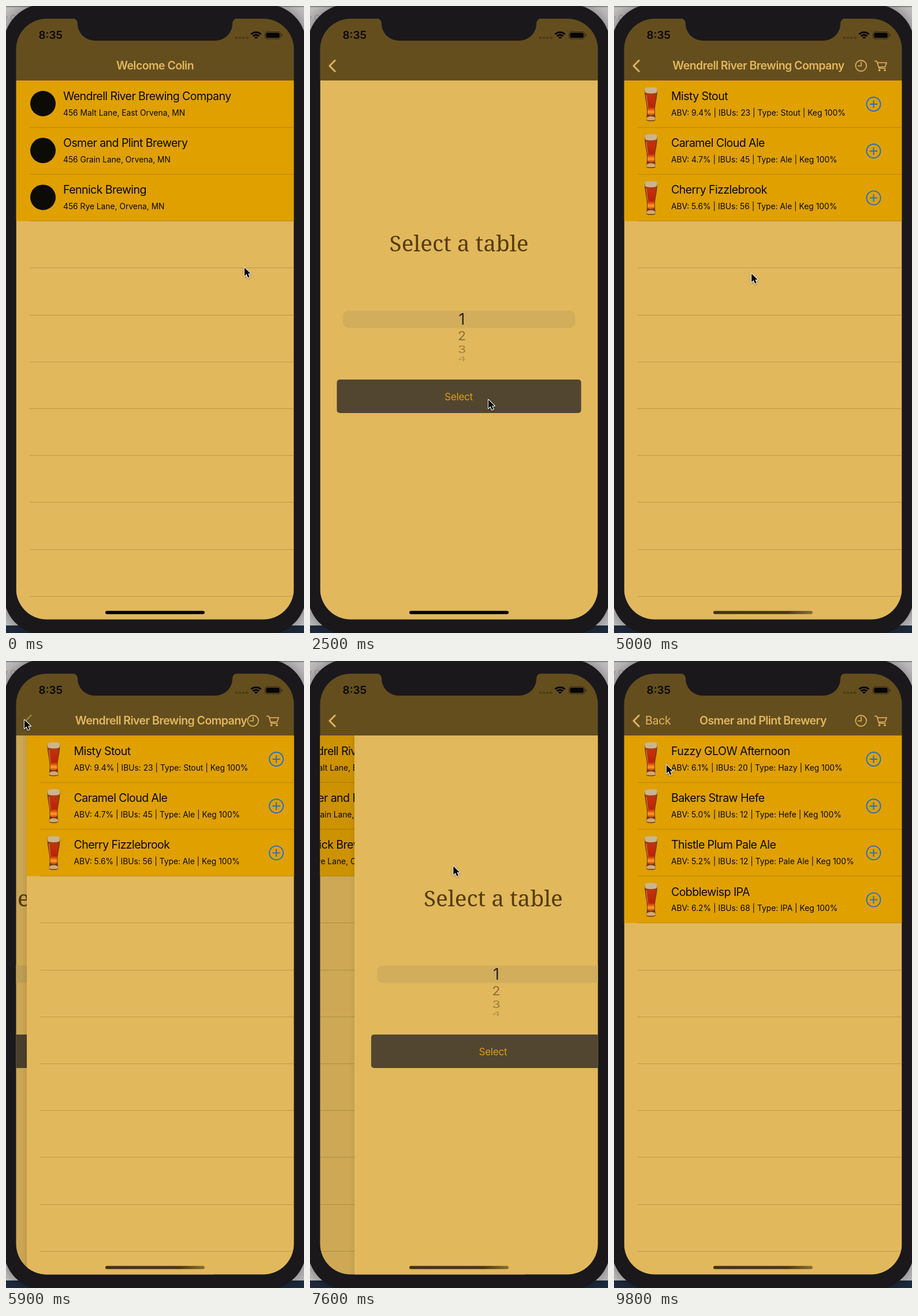
Write an HTML page with a canvas that moves like this. It is 516 px wide and 1086 px high and loops after 9900 ms.

```html
<!DOCTYPE html>
<html lang="en">
<head>
<meta charset="utf-8">
<title>Brewery ordering app</title>
<style>
html, body { margin: 0; width: 100%; height: 100%; overflow: hidden; background: #c1bfc0; }
canvas { display: block; width: 516px; height: 1086px; }
</style>
</head>
<body>
<canvas id="stage" width="516" height="1086"></canvas>
<script>
const ctx = document.getElementById('stage').getContext('2d');
const LOOP = 9900;
const SCREEN = { x: 17.5, y: 22, w: 481, h: 1040.5 };
const BAR_BOTTOM = 129, ROW = 81.2, EMPTY_ROW = 51.1;
const SAND = '#e1b85c', AMBER = '#dfa000', BROWN = '#644e1e', GOLD = '#e2b75e', INK = '#0b0903';
const SANS = 'Inter, sans-serif', SERIF = '"Noto Serif", serif';

const breweries = [
  ['Wendrell River Brewing Company', '456 Malt Lane, East Orvena, MN'],
  ['Osmer and Plint Brewery', '456 Grain Lane, Orvena, MN'],
  ['Fennick Brewing', '456 Rye Lane, Orvena, MN']
];
const beer = (name, abv, ibus, type) =>
  [name, `ABV: ${abv}% | IBUs: ${ibus} | Type: ${type} | Keg 100%`];

const home = { title: 'Welcome Colin', titleX: 258, draw: () => drawList(breweries, drawLogo) };
const table = { title: '', draw: drawTable };
const firstMenu = {
  title: breweries[0][0], titleX: 250, icons: true, loaded: 4400,
  beers: [
    beer('Misty Stout', '9.4', 23, 'Stout'),
    beer('Caramel Cloud Ale', '4.7', 45, 'Ale'),
    beer('Cherry Fizzlebrook', '5.6', 56, 'Ale')
  ],
  draw: drawMenu
};
const secondMenu = {
  title: breweries[1][0], titleX: 258, label: 'Back', icons: true, loaded: 9500,
  beers: [
    beer('Fuzzy GLOW Afternoon', '6.1', 20, 'Hazy'),
    beer('Bakers Straw Hefe', '5.0', 12, 'Hefe'),
    beer('Thistle Plum Pale Ale', '5.2', 12, 'Pale Ale'),
    beer('Cobblewisp IPA', '6.2', 68, 'IPA')
  ],
  draw: drawMenu
};

const moves = [
  { at: -1000, lower: home, upper: table, pop: true },
  { at: 950, lower: home, upper: table },
  { at: 3742, lower: table, upper: firstMenu },
  { at: 5894.5, lower: table, upper: firstMenu, pop: true },
  { at: 6649, lower: home, upper: table, pop: true },
  { at: 7350, lower: home, upper: table },
  { at: 9000, lower: table, upper: secondMenu }
];
const SLIDE = 500;

// Each key is [time, ...values].
const cursorPath = [
  [0, 412, 452], [800, 300, 186], [1150, 300, 186], [2100, 308, 681], [3650, 308, 681],
  [4100, 310, 601], [4700, 310, 590], [5600, 31, 101], [5950, 31, 101], [6500, 38, 112],
  [6950, 38, 112], [7300, 240, 250], [7450, 240, 250], [7850, 263, 576], [7950, 263, 576],
  [8400, 263, 504], [8550, 263, 490], [8900, 290, 678], [9150, 290, 678], [9750, 90, 179]
];
const pickerPath = [[7950, 0], [8400, 2.5], [8750, 3]];
const chevronPath = [
  [5700, 1], [5800, .42], [5950, .42], [6150, 1], [6550, 1], [6650, .25], [6950, .15], [7000, 0]
];

const clamp = v => Math.max(0, Math.min(1, v));

function track(keys, t) {
  const next = keys.findIndex(k => k[0] > t);
  if (next === 0) return keys[0].slice(1);
  if (next < 0) return keys[keys.length - 1].slice(1);
  const a = keys[next - 1], b = keys[next];
  const u = (t - a[0]) / (b[0] - a[0]), s = u * u * (3 - 2 * u);
  return a.slice(1).map((v, i) => v + (b[i + 1] - v) * s);
}

function text(str, x, y, font, color, align = 'left', spacing = 0) {
  ctx.font = font;
  ctx.fillStyle = color;
  ctx.textAlign = align;
  ctx.letterSpacing = spacing + 'px';
  ctx.fillText(str, x, y);
}

function box(x, y, w, h, r, color) {
  ctx.fillStyle = color;
  ctx.beginPath();
  ctx.roundRect(x, y, w, h, r);
  ctx.fill();
}

function disc(x, y, r, color) {
  ctx.fillStyle = color;
  ctx.beginPath();
  ctx.arc(x, y, r, 0, Math.PI * 2);
  ctx.fill();
}

function line(path, color, width) {
  ctx.strokeStyle = color;
  ctx.lineWidth = width;
  ctx.stroke(new Path2D(path));
}

function shape(path, color) {
  ctx.fillStyle = color;
  ctx.fill(new Path2D(path));
}

function at(x, y, paint) {
  ctx.save();
  ctx.translate(x, y);
  paint();
  ctx.restore();
}

function gradient(x0, y0, x1, y1, ...stops) {
  const g = ctx.createLinearGradient(x0, y0, x1, y1);
  stops.forEach(stop => g.addColorStop(...stop));
  return g;
}

function separators(step) {
  ctx.fillStyle = 'rgba(85,50,0,.23)';
  for (let y = BAR_BOTTOM + step; y < 1062; y += step) ctx.fillRect(40.5, Math.floor(y), 460, 1);
}

function drawLogo(y) {
  disc(64, y + 40, 22, '#0d0b05');
}

function drawGlass(y) {
  at(64, y + 12, () => {
    const ale = gradient(0, 9, 0, 51, [0, '#a83d14'], [.2, '#c22f0b'], [.6, '#b82404'],
      [.72, '#f06a12'], [.8, '#ffa030'], [.92, '#d34b08'], [1, '#7d2706']);
    shape('M-11 3 C-11 22-6 30-7 45 L-8 57 Q0 60 8 57 L7 45 C6 30 11 22 11 3Z', '#6e3a16');
    shape('M-9 8 C-9 23-5 31-6 46 Q0 52 6 46 C5 31 9 23 9 8Z', ale);
    shape('M-11 3 Q-8-1 0 0 Q9-1 11 3 L10 9 Q0 12-10 9Z', '#cbb58d');
    shape('M-7 52 Q0 48 7 52 L8 56 Q0 58-8 56Z', '#d3a876');
    line('M-8 13 Q-7 27-5 35', 'rgba(255,205,150,.5)', 1.2);
  });
}

function drawAdd(y) {
  const cy = y + 41;
  line(`M437.5 ${cy} a12 12 0 1 0 24 0 a12 12 0 1 0 -24 0 M443 ${cy} h13 m-6.5 -6.5 v13`, '#2270c0', 1.9);
}

function drawList(rows, drawIcon, drawAction = () => {}) {
  ctx.fillStyle = AMBER;
  ctx.fillRect(17, BAR_BOTTOM, 482, ROW * rows.length);
  separators(ROW);
  rows.forEach(([name, detail], i) => {
    const y = BAR_BOTTOM + i * ROW;
    drawIcon(y);
    text(name, 99, y + 34, '400 19.6px ' + SANS, INK, 'left', -.6);
    text(detail, 99, y + 60.5, '400 13.8px ' + SANS, INK);
    drawAction(y);
  });
}

function drawMenu(t) {
  if (t < this.loaded) separators(EMPTY_ROW);
  else drawList(this.beers, drawGlass, drawAdd);
}

// Digits sit on a cylinder, and the selection band shows a larger, darker copy.
function drawPicker(position) {
  const centre = 542.5, radius = 76, pitch = .38;
  const digits = (size, color, fade) => {
    for (let n = 1; n <= 12; n++) {
      const angle = (n - 1 - position) * pitch;
      if (Math.abs(angle) > 1.35) continue;
      ctx.save();
      ctx.translate(263, centre + radius * Math.sin(angle));
      ctx.scale(1, Math.cos(angle));
      ctx.globalAlpha = fade ? .62 * Math.cos(angle) ** .9 : 1;
      text(n, 0, size * .364, `400 ${size}px ${SANS}`, color, 'center');
      ctx.restore();
    }
  };
  const band = new Path2D(), rest = new Path2D();
  band.rect(57, 527.5, 402, 30);
  rest.rect(57, 450, 402, 77.5);
  rest.rect(57, 557.5, 402, 77.5);
  for (const [clip, ...style] of [[rest, 23.5, '#4d3a18', true], [band, 26.5, '#2b261c', false]]) {
    ctx.save();
    ctx.clip(clip);
    digits(...style);
    ctx.restore();
  }
}

function drawTable(t) {
  text('Select a table', 258, 424.5, '400 38.7px ' + SERIF, '#583c08', 'center');
  box(57, 527.5, 402, 30, 9, '#d1ad5c');
  drawPicker(track(pickerPath, t)[0]);
  box(46.5, 647, 423, 58, 5, '#524630');
  text('Select', 257.5, 682.5, '400 17px ' + SANS, '#dd9e16', 'center', -.2);
}

function drawPage(page, x, t) {
  at(x, 0, () => {
    ctx.beginPath();
    ctx.rect(17.5, BAR_BOTTOM, 481, 934);
    ctx.clip();
    ctx.fillStyle = SAND;
    ctx.fillRect(17, BAR_BOTTOM, 482, 934);
    page.draw(t);
  });
}

function drawTitle(page, shift, alpha, fadeRight) {
  const color = fadeRight ? gradient(372, 0, 414, 0, [0, GOLD], [1, 'rgba(226,183,94,.2)']) : GOLD;
  ctx.globalAlpha = clamp(alpha);
  text(page.title, page.titleX + shift, 110, '600 19.6px ' + SANS, color, 'center', -.6);
  ctx.globalAlpha = 1;
}

function drawBar(move, offset, t) {
  const { lower, upper, pop } = move;
  const shown = 1 - offset / SCREEN.w;
  ctx.fillStyle = BROWN;
  ctx.fillRect(17, 22, 482, 107);
  drawTitle(lower, -170 * shown, pop ? 1 - shown * 9 : 1 - shown * 2);
  drawTitle(upper, offset, pop ? shown * 2 - .5 : shown * 1.6 - .5, !pop && upper === firstMenu && offset > 1);
  if (upper.icons) {
    ctx.globalAlpha = clamp(shown * 1.6 - .5);
    line('M418.3 103.5 a9.4 9.4 0 1 0 18.8 0 a9.4 9.4 0 1 0 -18.8 0 M428 96.5 V103.8 H422', GOLD, 1.6);
    line('M451 95.5 h4 l4 12.5 h11.5 M456 98.3 h16 l-2.5 7 -12 .8', GOLD, 1.6);
    disc(459.5, 111.3, 1.7, GOLD);
    disc(469, 111.3, 1.7, GOLD);
  }
  const present = lower === home ? clamp(shown * 2) : 1;
  ctx.globalAlpha = pop && shown > 0 ? track(chevronPath, t)[0] : pop && lower === table ? track(chevronPath, t)[0] : present;
  line('M44 93.5 L34 103.7 L44 113.9', GOLD, 2.8);
  if (upper.label) {
    ctx.globalAlpha = clamp(shown * 2 - 1);
    text(upper.label, 54, 110, '400 19.6px ' + SANS, GOLD, 'left', -.3);
  }
  ctx.globalAlpha = 1;
}

function drawStatus(t) {
  text('8:35', 56.5, 57.3, '600 18.8px ' + SANS, '#080704');
  for (let i = 0; i < 4; i++) box(397 + i * 6, 53, 4, 4, 1.5, '#4d3c17');
  for (const r of [3, 7.5, 12]) {
    ctx.beginPath();
    ctx.arc(433, 57.5, r, -Math.PI * .75, -Math.PI * .25);
    ctx.strokeStyle = '#080704';
    ctx.lineWidth = 3;
    ctx.stroke();
  }
  ctx.strokeStyle = '#332812';
  ctx.lineWidth = 1.1;
  ctx.beginPath();
  ctx.roundRect(448.5, 44.5, 27, 12.5, 3.8);
  ctx.stroke();
  box(450.2, 46.2, 23.6, 9.1, 2.2, '#050403');
  box(477, 48.7, 1.6, 4.2, 1, '#332812');

  const softened = gradient(172, 0, 344, 0, [0, '#443313'], [.75, '#4b3916'], [1, '#8b6e35']);
  box(172, 1047.7, 172, 5.6, 2.8, softened);
  ctx.globalAlpha = 1 - clamp((t - 3650) / 300);
  box(172, 1047.7, 172, 5.6, 2.8, '#050403');
  ctx.globalAlpha = 1;
}

function drawBezel() {
  ctx.fillStyle = '#c1bfc0';
  ctx.fillRect(0, 0, 516, 1086);
  ctx.fillStyle = '#8d8b8b';
  ctx.fillRect(0, 0, 516, 2);
  ctx.fillStyle = '#1d2a3d';
  ctx.fillRect(0, 1073, 516, 13);
  text('v C', -4, 25, '400 13px ' + SANS, '#9b999a');
  ctx.save();
  ctx.shadowColor = 'rgba(0,0,0,.4)';
  ctx.shadowBlur = 26;
  box(-4, -3, 524, 1092, 70, '#1a181b');
  ctx.restore();
}

function drawCursor(x, y) {
  at(x, y, () => {
    ctx.scale(.88, .88);
    ctx.lineJoin = 'round';
    ctx.shadowColor = 'rgba(0,0,0,.35)';
    ctx.shadowBlur = 3;
    ctx.shadowOffsetY = 1;
    const arrow = 'M1 1 V18 L5 14.3 L8 21 L11 19.7 L8.2 13.2 H13.2Z';
    line(arrow, '#fff', 2.4);
    ctx.shadowColor = 'transparent';
    shape(arrow, '#050505');
  });
}

function render(t) {
  const move = moves.filter(m => m.at <= t).pop();
  const progress = 1 - (1 - clamp((t - move.at) / SLIDE)) ** 3;
  const shown = move.pop ? 1 - progress : progress;
  const offset = SCREEN.w * (1 - shown);
  const edge = SCREEN.x + offset;

  drawBezel();
  ctx.save();
  ctx.beginPath();
  ctx.roundRect(SCREEN.x, SCREEN.y, SCREEN.w, SCREEN.h, 53);
  ctx.clip();
  if (shown < 1) {
    drawPage(move.lower, -.3 * SCREEN.w * shown, t);
    ctx.fillStyle = `rgba(0,0,0,${.1 * shown})`;
    ctx.fillRect(17, BAR_BOTTOM, offset + 1, 934);
    ctx.fillStyle = gradient(edge - 9, 0, edge, 0, [0, 'rgba(0,0,0,0)'], [1, `rgba(0,0,0,${.06 * shown})`]);
    ctx.fillRect(edge - 9, BAR_BOTTOM, 9, 934);
  }
  if (shown > 0) drawPage(move.upper, offset, t);
  drawBar(move, offset, t);
  drawStatus(t);
  shape('M114 21 Q124 22 124 31 A30 29 0 0 0 154 60 H362 A30 29 0 0 0 392 31 Q392 22 402 21Z', '#1a181b');
  ctx.restore();
  drawCursor(...track(cursorPath, t));
}

function frame() {
  render(performance.now() % LOOP);
  requestAnimationFrame(frame);
}
frame();
</script>
</body>
</html>
```
